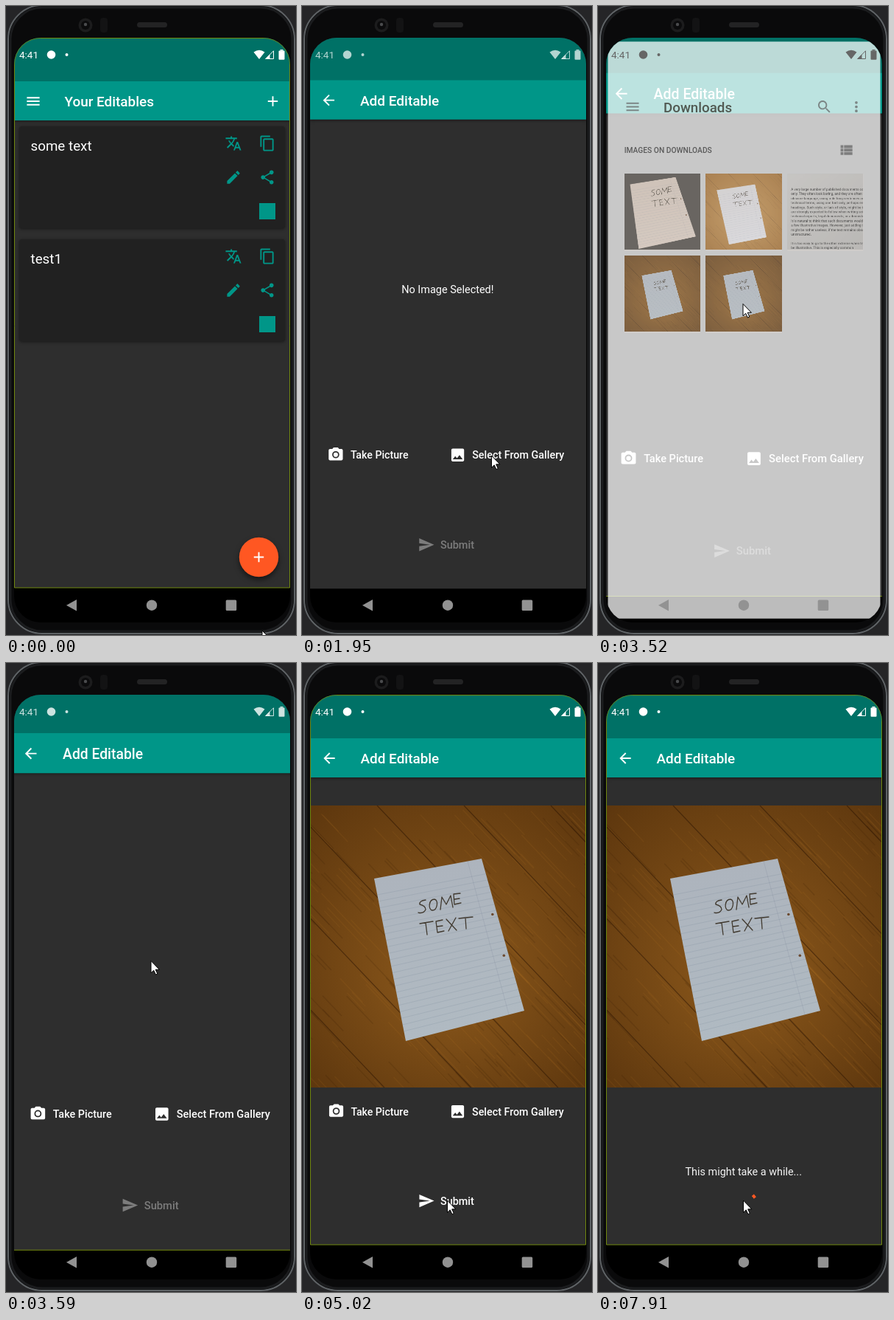
Recreate the animation shown at these times as an HTML page with a canvas. Size 394 px wide and 852 px high, loop 7990 ms.

```html
<!DOCTYPE html>
<html lang="en">
<head>
<meta charset="utf-8">
<title>Add Editable</title>
<style>
html, body { margin: 0; width: 100%; height: 100%; overflow: hidden; background: #1d1d1f; }
canvas { display: block; }
</style>
</head>
<body>
<canvas id="stage" width="394" height="852"></canvas>
<script>
const LOOP = 7990, TEAL = '#009688', ORANGE = '#ff5722', BG = '#2e2e2e', DIM = 124;
let c = document.getElementById('stage').getContext('2d');

const icons = {
  menu: 'M3 18h18v-2H3zm0-5h18v-2H3zm0-7v2h18V6z',
  add: 'M19 13h-6v6h-2v-6H5v-2h6V5h2v6h6z',
  back: 'M20 11H7.83l5.59-5.59L12 4l-8 8 8 8 1.41-1.41L7.83 13H20z',
  translate: 'M12.87 15.07l-2.54-2.51.03-.03c1.74-1.94 2.98-4.17 3.71-6.53H17V4h-7V2H8v2H1v1.99h11.17C11.5 7.92 10.44 9.75 9 11.35 8.07 10.32 7.3 9.19 6.69 8h-2c.73 1.63 1.73 3.17 2.98 4.56l-5.09 5.02L4 19l5-5 3.11 3.11zM18.5 10h-2L12 22h2l1.12-3h4.75L21 22h2zm-2.62 7l1.62-4.33L19.12 17z',
  copy: 'M16 1H4c-1.1 0-2 .9-2 2v14h2V3h12zm3 4H8c-1.1 0-2 .9-2 2v14c0 1.1.9 2 2 2h11c1.1 0 2-.9 2-2V7c0-1.1-.9-2-2-2zm0 16H8V7h11z',
  edit: 'M3 17.25V21h3.75L17.81 9.94l-3.75-3.75zM20.71 7.04c.39-.39.39-1.02 0-1.41l-2.34-2.34c-.39-.39-1.02-.39-1.41 0l-1.83 1.83 3.75 3.75z',
  share: 'M18 16.08c-.76 0-1.44.3-1.96.77L8.91 12.7c.05-.23.09-.46.09-.7s-.04-.47-.09-.7l7.05-4.11c.54.5 1.25.81 2.04.81 1.66 0 3-1.34 3-3s-1.34-3-3-3-3 1.34-3 3c0 .24.04.47.09.7L8.04 9.81C7.5 9.31 6.79 9 6 9c-1.66 0-3 1.34-3 3s1.34 3 3 3c.79 0 1.5-.31 2.04-.81l7.12 4.16c-.05.21-.08.43-.08.65 0 1.61 1.31 2.92 2.92 2.92s2.92-1.31 2.92-2.92-1.31-2.92-2.92-2.92z',
  camera: 'M9 2L7.17 4H4c-1.1 0-2 .9-2 2v12c0 1.1.9 2 2 2h16c1.1 0 2-.9 2-2V6c0-1.1-.9-2-2-2h-3.17L15 2zM7 12a5 5 0 0 0 10 0a5 5 0 0 0-10 0zM8.8 12a3.2 3.2 0 0 0 6.4 0a3.2 3.2 0 0 0-6.4 0z',
  image: 'M21 19V5c0-1.1-.9-2-2-2H5c-1.1 0-2 .9-2 2v14c0 1.1.9 2 2 2h14c1.1 0 2-.9 2-2zM8.5 13.5l2.5 3.01L14.5 12l4.5 6H5z',
  send: 'M2.01 21L23 12 2.01 3 2 10l15 2-15 2z',
  search: 'M15.5 14h-.79l-.28-.27C15.41 12.59 16 11.11 16 9.5 16 5.91 13.09 3 9.5 3S3 5.91 3 9.5 5.91 16 9.5 16c1.61 0 3.09-.59 4.23-1.57l.27.28v.79l5 4.99L20.49 19zm-6 0C7.01 14 5 11.99 5 9.5S7.01 5 9.5 5 14 7.01 14 9.5 11.99 14 9.5 14z',
  more: 'M10 6a2 2 0 0 0 4 0a2 2 0 0 0-4 0zM10 12a2 2 0 0 0 4 0a2 2 0 0 0-4 0zM10 18a2 2 0 0 0 4 0a2 2 0 0 0-4 0z',
  list: 'M4 14h4v-4H4zm0 5h4v-4H4zM4 9h4V5H4zm5 5h12v-4H9zm0 5h12v-4H9zM9 5v4h12V5z'
};
for (const k in icons) icons[k] = new Path2D(icons[k]);
const arrow = new Path2D('M0 0V16.3L3.7 12.8 6.4 18.6 8.8 17.5 6.2 11.8H11.4Z');
const writing = new Path2D('M168 321q-9 1-8 6q8 2 8 7q-3 6-10 4M180 320c-8 0-9 14-3 15c7 0 9-14 3-15M188 334l2-17l6 10l6-12l3 16M215 312l-9 1l1 14l9-2M207 320l7-1M160 353l18-3M168 352l2 16M191 348l-9 2l2 15l9-2M183 357l8-1M196 347l14 15M209 345l-10 18M213 346l19-2M222 345l1 15');

// Helpers
const clamp = v => Math.max(0, Math.min(1, v));
const span = (t, a, b) => clamp((t - a) / (b - a));
const mix = (a, b, k) => a + (b - a) * k;

// cubic-bezier(.4, 0, .2, 1)
function ease(x) {
  let lo = 0, hi = 1, u;
  for (let i = 0; i < 20; i++) {
    u = (lo + hi) / 2;
    if (1.2 * u * (1 - u) ** 2 + .6 * u * u * (1 - u) + u ** 3 < x) lo = u; else hi = u;
  }
  return 3 * u * u * (1 - u) + u ** 3;
}

function rect(x, y, w, h, fill, r = 0) {
  c.fillStyle = fill;
  c.beginPath();
  c.roundRect(x, y, w, h, r);
  c.fill();
}

function disc(x, y, r, fill) {
  c.fillStyle = fill;
  c.beginPath();
  c.arc(x, y, r, 0, 7);
  c.fill();
}

function poly(points, fill) {
  c.fillStyle = fill;
  c.beginPath();
  points.forEach(p => c.lineTo(...p));
  c.closePath();
  c.fill();
}

function line(x1, y1, x2, y2, color, width = 1) {
  c.strokeStyle = color;
  c.lineWidth = width;
  c.beginPath();
  c.moveTo(x1, y1);
  c.lineTo(x2, y2);
  c.stroke();
}

function text(s, x, y, size, fill = '#fff', weight = 400) {
  c.font = `${weight} ${size}px Roboto, sans-serif`;
  c.fillStyle = fill;
  c.fillText(s, x, y);
}

function icon(name, x, y, fill = '#fff', size = 23) {
  const s = size / 24;
  c.save();
  c.translate(x - size / 2, y - size / 2);
  c.scale(s, s);
  c.fillStyle = fill;
  c.fill(icons[name], 'evenodd');
  c.restore();
}

function shadowed(dy, blur, draw) {
  c.save();
  c.shadowColor = 'rgba(0,0,0,.5)';
  c.shadowOffsetY = dy;
  c.shadowBlur = blur;
  draw();
  c.restore();
}

function zoomed(s, alpha, draw) {
  c.save();
  c.globalAlpha = alpha;
  c.translate(198, 439);
  c.scale(s, s);
  c.translate(-198, -439);
  draw();
  c.restore();
}

// Photos, painted once
function photo(w, h, zoom, paint) {
  const cv = document.createElement('canvas'), main = c;
  cv.width = w * zoom;
  cv.height = h * zoom;
  c = cv.getContext('2d');
  c.scale(zoom, zoom);
  paint(w, h);
  c = main;
  return cv;
}

function wood(w, h, inner, outer, gap) {
  const g = c.createRadialGradient(w * .5, h * .6, w * .1, w * .5, h * .5, w * .75);
  g.addColorStop(0, inner);
  g.addColorStop(1, outer);
  rect(0, 0, w, h, g);
  let seed = 7;
  const rnd = () => (seed = seed * 16807 % 2147483647) / 2147483647;
  for (let i = 0; i < 260; i++) {
    const x = rnd() * w * 1.2 - w * .2, y = rnd() * h, l = w * (.04 + rnd() * .12);
    line(x, y, x + l, y + l * 1.05, rnd() < .5 ? 'rgba(50,25,0,.16)' : 'rgba(190,125,45,.1)', w / 260);
  }
  for (let x = -h; x < w; x += gap) line(x, 0, x + h, h * 1.05, 'rgba(40,18,0,.5)', w / 300);
}

function paper(quad, top, bottom, x, y, s) {
  const [a, b, d, e] = quad;
  const g = c.createLinearGradient(...a, ...e);
  g.addColorStop(0, top);
  g.addColorStop(1, bottom);
  poly(quad, g);
  const at = (p, q, k) => [mix(p[0], q[0], k), mix(p[1], q[1], k)];
  for (let k = .1; k < .97; k += .04)
    line(...at(a, e, k), ...at(b, d, k), 'rgba(80,100,125,.2)', .7 * s);
  line(...at(a, b, .87), ...at(e, d, .87), 'rgba(80,90,120,.18)', .7 * s);
  for (const k of [.36, .63]) disc(...at(at(a, b, .96), at(e, d, .96), k), 1.8 * s, '#6b4a30');
  c.save();
  c.translate(x, y);
  c.scale(s, s);
  c.translate(-158, -312);
  c.strokeStyle = '#40392f';
  c.lineWidth = 1.3;
  c.lineJoin = c.lineCap = 'round';
  c.stroke(writing);
  c.restore();
}

const floorPhoto = photo(374, 382, 1, (w, h) => {
  wood(w, h, '#87551a', '#5b350d', 118);
  paper([[86, 99], [232, 72], [290, 278], [129, 319]], '#adb4bd', '#b0bac2', 146, 119, 1);
});
const carpetPhoto = photo(105, 105, 2, (w, h) => {
  rect(0, 0, w, h, '#45413c');
  paper([[8, 15], [71, 5], [99, 87], [20, 104]], '#cfc0b4', '#d6c8bd', 37, 18, .49);
});
const brightPhoto = photo(105, 105, 2, (w, h) => {
  wood(w, h, '#bd8a48', '#9a6426', 34);
  paper([[15, 23], [68, 15], [84, 88], [32, 98]], '#d6d4d6', '#dddde2', 37, 25, .37);
});
const pagePhoto = photo(105, 105, 2, (w, h) => {
  const g = c.createLinearGradient(0, 0, w, h);
  g.addColorStop(0, '#c4c3c1');
  g.addColorStop(1, '#b2b1af');
  rect(0, 0, w, h, g);
  ['A very large number of published documents contain text',
   'only. They often look boring, and they are often written in',
   'obscure language, using mile-long sentences and cryptic',
   'technical terms, using one font only, perhaps even without',
   'headings. Such style, or lack of style, might be the one you',
   'are strongly expected to follow when writing scientific or',
   'technical reports, legal documents, or administrative papers.',
   'It is natural to think that such documents would benefit from',
   'a few illustrative images. However, just adding illustration',
   'might be rather useless, if the text remains obscure and',
   'unstructured.', '',
   'It is too easy to go to the other extreme when trying to',
   'be illustrative. This is especially common'
  ].forEach((s, i) => text(s, 5, 23.5 + i * 6.2, 4.7, '#3c3c3c', 500));
});

// Screens
function appBar(name, title) {
  rect(11, 43, 375, 745, BG);
  shadowed(1, 4, () => rect(11, 43, 375, 112, TEAL));
  icon(name, 37, 129);
  text(title, 79.5, 136, 18.9, '#fff', 500);
}

function home(t) {
  appBar('menu', 'Your Editables');
  icon('add', 362.5, 129);
  ['some text', 'test1'].forEach((s, i) => {
    const y = 163 + i * 153;
    shadowed(1, 4, () => rect(18, y, 361, 138, '#212121', 4));
    text(s, 33.5, y + 33, 18.8);
    icon('translate', 309, y + 23, TEAL);
    icon('copy', 355, y + 23, TEAL);
    icon('edit', 309, y + 69, TEAL);
    icon('share', 355, y + 69, TEAL);
    rect(344, y + 104, 22, 22, TEAL);
  });
  shadowed(4, 7, () => disc(343.5, 746.5, 26.7, ORANGE));
  const k = span(t, 640, 850);
  if (k) disc(343.5, 746.5, 26.7 * k, 'rgba(255,255,255,.2)');
  icon('add', 343.5, 746.5);
}

function ripple(x, y, w, k) {
  if (k > 0 && k < 1) rect(x, y, w, 34, `rgba(255,255,255,${.14 * Math.sin(k * Math.PI)})`, 4);
}

function spinner(t) {
  const p = t / 1333 % 1, sweep = 1.5 * Math.PI;
  const head = ease(clamp(p * 2)) * sweep, tail = ease(clamp(p * 2 - 1)) * sweep;
  const start = -Math.PI / 2 + tail + t / 2222 * 2 * Math.PI + p * Math.PI / 2;
  c.strokeStyle = ORANGE;
  c.lineWidth = 4;
  c.lineCap = 'square';
  c.beginPath();
  c.arc(198, 733.7, 17.8, start, start + Math.max(head - tail, .01));
  c.stroke();
  c.lineCap = 'butt';
}

function addPage(t) {
  appBar('back', 'Add Editable');
  if (t < 3500) text('No Image Selected!', 135.5, 389, 14.4);
  if (t >= 4620) c.drawImage(floorPhoto, 12, 193);
  if (t >= 5330) {
    text('This might take a while...', 118.5, 693.5, 14.4, '#f4f4f4');
    spinner(t - 5330);
    return;
  }
  ripple(193, 590, 173, span(t, 1630, 1930));
  ripple(150, 711, 94, span(t, 5190, 5330));
  icon('camera', 46.5, 607);
  text('Take Picture', 66.5, 612.5, 14.1, '#fff', 500);
  icon('image', 211.5, 607.5);
  text('Select From Gallery', 231, 612.5, 14.3, '#fff', 500);
  const v = t < 4620 ? DIM : 255;
  icon('send', 169, 728.5, t < 4480 ? `rgb(${DIM},${DIM},${DIM})` : '#fff');
  text('Submit', 188, 733.5, 14.4, `rgb(${v},${v},${v})`, 500);
}

function appWindow(t) {
  if (t < 1080) home(t);
  if (t > 780) {
    const p = span(t, 780, 1080);
    c.save();
    c.beginPath();
    c.rect(11, 43, 375, 745);
    c.clip();
    c.globalAlpha *= p * p;
    c.translate(0, 186 * (1 - ease(p)));
    addPage(t);
    c.restore();
  }
  rect(11, 43, 375, 59, 'rgba(0,0,0,.25)');
  rect(0, 788, 394, 60, '#000');
  if (t < 1630 || t > 3500) {
    c.strokeStyle = '#71880f';
    c.lineWidth = 1;
    c.beginPath();
    c.roundRect(11.5, 43.5, 374, 744.5, [35, 35, 0, 0]);
    c.stroke();
  }
}

function downloads() {
  rect(11, 43, 375, 792, '#fff');
  icon('menu', 45, 132.5, '#666');
  text('Downloads', 87.5, 140, 19, '#2b281f', 500);
  icon('search', 309, 132.5, '#666');
  icon('more', 353, 132.5, '#666');
  text('IMAGES ON DOWNLOADS', 33.5, 196, 10.4, '#333', 500);
  icon('list', 339, 192, '#666');
  [carpetPhoto, brightPhoto, pagePhoto, floorPhoto, floorPhoto].forEach((img, i) => {
    const x = 33.5 + i % 3 * 112.3, y = i < 3 ? 224 : 337;
    rect(x, y + 1, 104.5, 105, '#d5d0cc');
    c.drawImage(img, x, y, 104.5, 104.5);
  });
}

function statusBar(t) {
  const light = t >= 2080 && t < 3540;
  let a = 1;
  if (t < 2080) a = mix(1, .7, span(t, 1800, 1950));
  if (t >= 3540) a = mix(.8, 1, span(t, 3590, 3900));
  const fill = light ? '#666' : `rgba(255,255,255,${a})`;
  text('4:41', 18, 71, 13.5, fill);
  disc(61.5, 66, 5.8, fill);
  disc(82.5, 66, 2, fill);
  c.fill(new Path2D('M344 72L336.5 62.5Q344 57 351.5 62.5ZM352 72L358.5 65.5V72Z'));
  c.strokeStyle = fill;
  c.lineWidth = 1;
  c.stroke(new Path2D('M363.5 60.8V71.5H352.8Z'));
  rect(370.5, 60.5, 8, 12.2, fill, 1);
  rect(372.5, 59, 4, 1.5, fill);
}

function navBar() {
  const fill = '#929292';
  poly([[82, 811.7], [96, 804], [96, 819.5]], fill);
  disc(198, 811.7, 7.2, fill);
  rect(298.7, 804.5, 14.5, 14.5, fill, 1.5);
}

function body() {
  rect(0, 0, 394, 852, '#252527');
  rect(2, -2, 391, 853, '#0a0a0b', 48);
  [[3, '#5f6366', 2], [6, '#1b1c1e', 3]].forEach(([d, color, width]) => {
    c.strokeStyle = color;
    c.lineWidth = width;
    c.beginPath();
    c.roundRect(d, d - 4, 395 - 2 * d, 857 - 2 * d, 49 - d);
    c.stroke();
  });
  disc(108, 26, 9.5, '#1c1c1d');
  disc(108, 26, 6, '#0b0b0c');
  disc(108, 25, 2.2, '#4a4b4d');
  rect(128, 16, 10, 20, '#131314', 4);
  rect(178, 22, 41, 7, '#232324', 3.5);
}

const track = [[70, 348, 846], [600, 343, 746], [930, 343, 746], [1460, 257.5, 609], [2000, 257.5, 609],
  [2420, 239.5, 578], [2500, 239.5, 578], [2950, 184.5, 391], [3200, 197, 403.5], [3640, 197, 403.5],
  [4410, 197.5, 721], [4560, 197.5, 721], [4620, 196, 727.5], [5010, 196, 727.5], [5020, 197.5, 728]];

function cursor(t) {
  let i = track.findIndex(k => k[0] > t);
  if (i < 0) i = track.length - 1;
  const b = track[i], a = track[Math.max(0, i - 1)];
  const k = a === b ? 0 : ease(span(t, a[0], b[0]));
  c.save();
  c.translate(mix(a[1], b[1], k), mix(a[2], b[2], k));
  c.fillStyle = '#fff';
  c.fill(arrow);
  c.strokeStyle = '#000';
  c.lineWidth = 1;
  c.stroke(arrow);
  c.restore();
}

function draw(t) {
  body();
  c.save();
  c.beginPath();
  c.roundRect(11, 43, 375, 792, 36);
  c.clip();
  const opening = t < 3000;
  const scale = opening ? 1 + .05 * ease(span(t, 1880, 2300)) : 1 + .05 * (1 - span(t, 3450, 4000)) ** 3;
  zoomed(scale, 1, () => appWindow(t));
  const shown = opening ? span(t, 1960, 2180) : 1 - span(t, 3500, 3580);
  if (shown) {
    const s = opening ? mix(.88, 1, ease(span(t, 1900, 2350))) : mix(.95, 1, shown);
    zoomed(s, shown, downloads);
  }
  statusBar(t);
  navBar();
  c.restore();
  cursor(t);
}

const begin = performance.now();
function tick() {
  draw((performance.now() - begin) % LOOP);
  requestAnimationFrame(tick);
}
tick();
</script>
</body>
</html>
```
